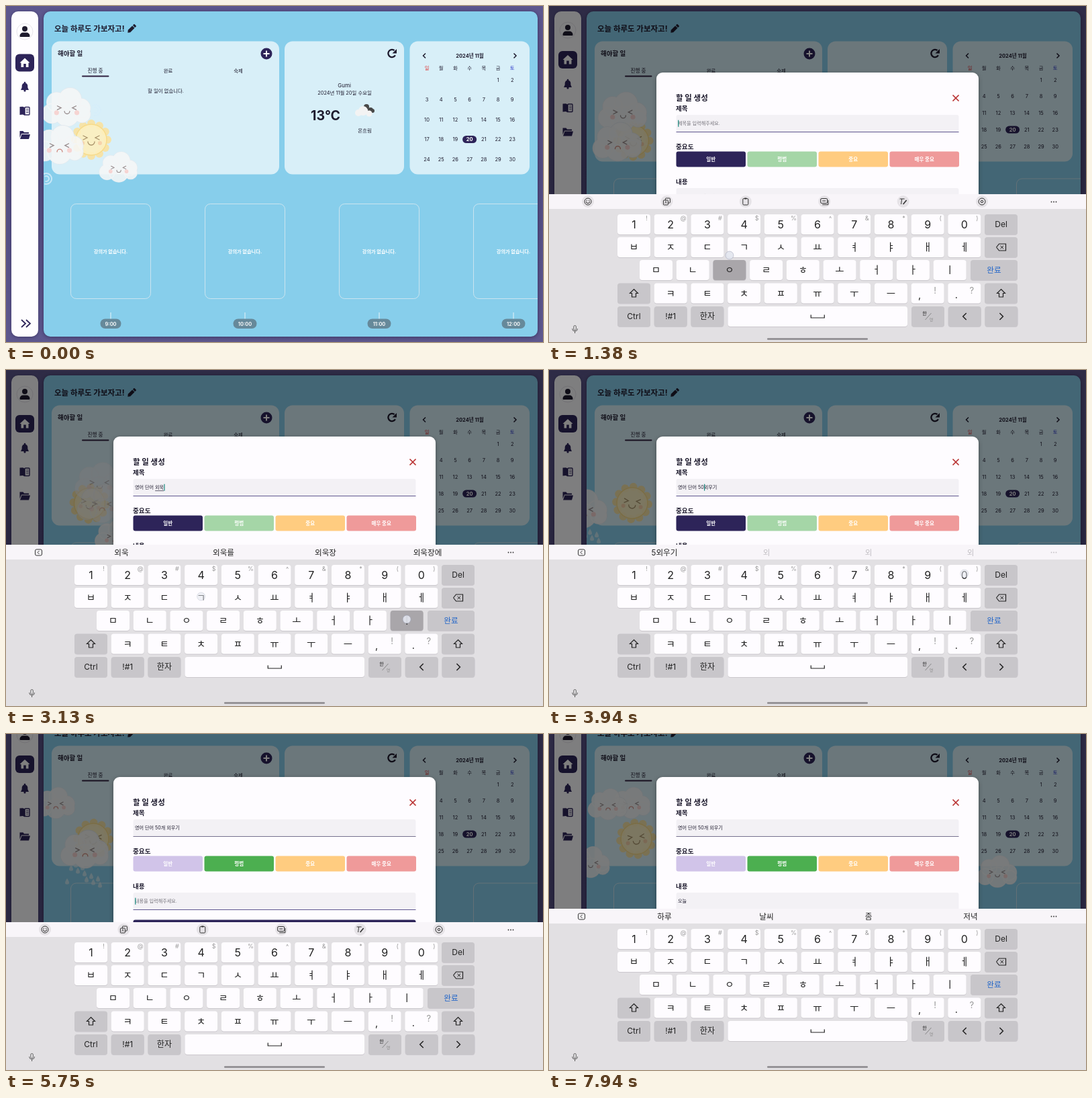
Recreate the animation shown at these times as an HTML page with a canvas. Size 800 by 500 pixels, loop 8000 ms.

```html
<!DOCTYPE html>
<html lang="ko">
<head>
<meta charset="utf-8">
<title>할 일 생성</title>
<style>
html, body { margin: 0; width: 100%; height: 100%; overflow: hidden; background: #56508a; }
canvas { display: block; width: 800px; height: 500px; }
</style>
</head>
<body>
<canvas id="stage" width="800" height="500"></canvas>
<script>
const c = document.getElementById('stage').getContext('2d');
const LOOP = 8000, NAVY = '#2d2459', INK = '#1e1b2e';
const FONT = "Inter, 'Noto Sans CJK KR', 'Noto Sans CJK JP', sans-serif";

// Drawing helpers
function box(x, y, w, h, r, fill, stroke, lw = 1) {
  c.beginPath();
  c.roundRect(x, y, w, h, r);
  if (fill) { c.fillStyle = fill; c.fill(); }
  if (stroke) { c.strokeStyle = stroke; c.lineWidth = lw; c.stroke(); }
}
function disc(x, y, r, fill) {
  c.beginPath();
  c.arc(x, y, r, 0, Math.PI * 2);
  c.fillStyle = fill;
  c.fill();
}
function line(points, color, lw = 1) {
  c.beginPath();
  for (let i = 0; i < points.length; i += 2) c.lineTo(points[i], points[i + 1]);
  c.strokeStyle = color;
  c.lineWidth = lw;
  c.stroke();
}
function shape(points, fill) {
  c.beginPath();
  for (let i = 0; i < points.length; i += 2) c.lineTo(points[i], points[i + 1]);
  c.closePath();
  c.fillStyle = fill;
  c.fill();
}
function text(s, x, y, size, color = INK, align = 'center', weight = 400) {
  c.font = `${weight} ${size}px ${FONT}`;
  c.textAlign = align;
  c.fillStyle = color;
  c.fillText(s, x, y + size * 0.36);
}
function at(x, y, draw) {
  c.save();
  c.translate(x, y);
  draw();
  c.restore();
}
function shadow(color, blur, dy) {
  c.shadowColor = color;
  c.shadowBlur = blur;
  c.shadowOffsetY = dy;
}

// Motion helpers
const clamp = v => Math.max(0, Math.min(1, v));
function ramp(t, a, b) {
  const u = clamp((t - a) / (b - a));
  return u * u * (3 - 2 * u);
}
function track(t, keys) {
  if (t <= keys[0][0]) return keys[0].slice(1);
  for (let i = 1; i < keys.length; i++) {
    const a = keys[i - 1], b = keys[i];
    if (t < b[0]) return a.slice(1).map((v, j) => v + (b[j + 1] - v) * (t - a[0]) / (b[0] - a[0]));
  }
  return keys[keys.length - 1].slice(1);
}

// Keyboard layout
const PITCH = 54.7, ROWS = [290, 324, 358, 392.5, 427];
const keys = [];
function addKey(label, x, row, w = 49, gray = false, hint = '') {
  keys.push({ label, x, y: ROWS[row], w, gray, hint });
}
[...'1234567890'].forEach((k, i) => addKey(k, 102 + PITCH * i, 0, 49, false, '!@#$%^&*()'[i]));
[...'ㅂㅈㄷㄱㅅㅛㅕㅑㅐㅔ'].forEach((k, i) => addKey(k, 102 + PITCH * i, 1));
[...'ㅁㄴㅇㄹㅎㅗㅓㅏㅣ'].forEach((k, i) => addKey(k, 135 + PITCH * i, 2));
[...'ㅋㅌㅊㅍㅠㅜㅡ,.'].forEach((k, i) => addKey(k, 102 + PITCH * (i + 1), 3, 49, false, ['!', '?'][i - 7] || ''));
addKey('Del', 649, 0, 49, true);
addKey('back', 649, 1, 49, true);
addKey('완료', 628, 2, 70, true);
addKey('shift', 102, 3, 49, true);
addKey('shift', 649, 3, 49, true);
['Ctrl', '!#1', '한자'].forEach((k, i) => addKey(k, 102 + PITCH * i, 4, 49, true));
addKey(' ', 266.5, 4, 267.5);
['한/영', '<', '>'].forEach((k, i) => addKey(k, 540 + PITCH * i, 4, 49, true));

// Each step: time, key, text before the caret, suggestions, text after the caret
const titleSteps = [
  [1430, 'ㅇ', 'ㅇ'], [1530, 'ㅕ', '여'], [1620, 'ㅇ', '영'], [1720, 'ㅇ', '영ㅇ'],
  [1820, 'ㅓ', '영어', '영어,영어로,영어를,영어는'], [1930, ' ', '영어 ', '공부,단어,수업,로'],
  [2020, 'ㄷ', '영어 ㄷ'], [2110, 'ㅏ', '영어 다'], [2190, 'ㄴ', '영어 단'], [2270, 'ㅇ', '영어 단ㅇ'],
  [2360, 'ㅓ', '영어 단어'], [2490, ' ', '영어 단어 ', '외우기,공부,시험,를'],
  [2610, 'ㅇ', '영어 단어 ㅇ'], [2700, 'ㅗ', '영어 단어 오'], [2790, 'ㅣ', '영어 단어 외'],
  [2890, 'ㅇ', '영어 단어 욍'], [2980, 'ㅜ', '영어 단어 외우'], [3080, 'ㄱ', '영어 단어 외욱'],
  [3180, 'ㅣ', '영어 단어 외우기', '외우기,외우기로,외우기는,외우기를'],
  [3480, '', '영어 단어 ', '외우기,외우기로,외우기는,외우기를', '외우기'],
  [3690, '5', '영어 단어 5', '~5외우기,외,외,외', '외우기'],
  [3890, '0', '영어 단어 50', '~5외우기,외,외,외', '외우기'],
  [4200, 'ㄱ', '영어 단어 50ㄱ', '개,가,그,것', '외우기'],
  [4340, 'ㅐ', '영어 단어 50개', '개,개의,개를,개월', '외우기'],
  [4520, ' ', '영어 단어 50개 ', '나,아,난,네', '외우기']
];
const bodySteps = [
  [6300, 'ㅇ', 'ㅇ', '오늘,아,이,어'], [6500, 'ㅗ', '오', '오,오늘,오전,오후'], [6720, 'ㄴ', '온', '온,오늘,온라인,온도'],
  [6950, 'ㅡ', '오느', '오늘,오늘은,오늘도,오느'], [7180, 'ㄹ', '오늘', '오늘,오늘은,오늘도,오늘의'],
  [7430, ' ', '오늘 ', '하루,날씨,좀,저녁']
];
const allSteps = [...titleSteps, ...bodySteps];
const lastStep = (steps, t) => steps.filter(s => s[0] <= t).pop();
const taps = [[140, 388, 71], [870, 300, 193], [3430, 231, 175], [4800, 347, 228], [5440, 300, 303]];

// Background creatures
function cloud(x, y, s, alpha, mood = 0) {
  if (alpha <= 0) return;
  at(x, y, () => {
    c.scale(s, s);
    c.globalAlpha = alpha * 0.88;
    c.beginPath();
    for (const [px, py, r] of [[-20, 8, 13], [-14, -7, 13], [4, -11, 15], [18, 1, 13], [20, 9, 11], [0, 9, 16]]) {
      c.moveTo(px + r, py);
      c.arc(px, py, r, 0, Math.PI * 2);
    }
    c.strokeStyle = '#e2eaef';
    c.lineWidth = 1.5;
    c.stroke();
    c.fillStyle = '#f6f7f8';
    c.fill();
    disc(-14, 7, 3.2, '#f8d0cd');
    disc(13, 7, 3.2, '#f8d0cd');
    const ink = '#8d7f80';
    line([-13, -2, -8, 0.5, -13, 3], ink, 1.2);
    line([12, -2, 7, 0.5, 12, 3], ink, 1.2);
    c.beginPath();
    c.arc(0, mood ? 9 : 5, 3.5, mood ? Math.PI : 0, mood ? 0 : Math.PI);
    c.strokeStyle = mood ? '#c8786d' : ink;
    c.stroke();
  });
}
function sun(t) {
  const [x, y] = track(t, [[0, 127, 199], [630, 126, 201], [3940, 124, 198], [5190, 130, 191], [8000, 130, 191]]);
  at(x, y, () => {
    c.globalAlpha = 0.9;
    c.rotate(Math.sin(t / 450) * 0.12);
    for (let i = 0; i < 12; i++) disc(24 * Math.cos(i * Math.PI / 6), 24 * Math.sin(i * Math.PI / 6), 6, '#fae3a0');
    disc(0, 0, 23, '#fdf0be');
    c.beginPath();
    c.arc(0, 0, 23, 0, Math.PI * 2);
    c.strokeStyle = '#f7da87';
    c.lineWidth = 1.5;
    c.stroke();
    line([-12, -6, -6, -3, -12, 0], '#a08a61', 1.3);
    line([12, -6, 6, -3, 12, 0], '#a08a61', 1.3);
    disc(-13, 5, 3, '#f8d0a8');
    disc(13, 5, 3, '#f8d0a8');
    c.beginPath();
    c.arc(0, 3, 5, 0, Math.PI);
    c.strokeStyle = '#a08a61';
    c.stroke();
  });
}
function rain(x, y, t) {
  c.globalAlpha = 0.75;
  for (let i = 0; i < 12; i++) {
    const px = x - 27 + (i * 23) % 56, py = y + 19 + (i * 17 + t * 0.045) % 38;
    c.beginPath();
    c.moveTo(px, py - 5);
    c.quadraticCurveTo(px + 6, py + 4, px, py + 4);
    c.quadraticCurveTo(px - 6, py + 4, px, py - 5);
    c.fillStyle = '#d9ecf5';
    c.fill();
  }
  c.globalAlpha = 1;
}
function swirl(x, y, alpha) {
  c.globalAlpha = alpha;
  c.strokeStyle = '#d6eefa';
  c.lineWidth = 2;
  for (const r of [4, 8]) {
    c.beginPath();
    c.arc(x, y, r, -2, 1.8);
    c.stroke();
  }
  c.globalAlpha = 1;
}
function creatures(t) {
  c.save();
  c.beginPath();
  c.roundRect(56, 8, 736, 484, 10);
  c.clip();
  c.lineCap = 'round';
  swirl(133 + t * 0.02, 155, 0.8 * (1 - ramp(t, 200, 500)));
  swirl(60 + t * 0.015, 257, 0.8 * (1 - ramp(t, 700, 1400)));
  sun(t);
  const late = ramp(t, 2800, 3500);
  cloud(...track(t, [[0, 91, 151], [630, 98, 152], [2440, 128, 165], [3500, 146, 168]]), 1.12, 1 - late);
  cloud(...track(t, [[0, 80, 207], [630, 85, 205], [2440, 127, 199], [3500, 152, 199]]), 1.12, 1 - late, 1);
  cloud(168 + t * 0.105, 240, 0.88, 1 - ramp(t, 300, 600));
  cloud(668 + (t - 7940) * 0.105, 248 - 8 * ramp(t, 2600, 5000), 0.92, 1, t < 4000 ? 1 : 0);
  const [rx, alpha] = track(t, [[3300, 20, 0], [3700, 40, 1], [3940, 52, 1], [5190, 96, 1], [5750, 118, 1], [6600, 148, 1], [7200, 168, 0]]);
  if (alpha > 0) {
    rain(rx, 205, t);
    cloud(rx, 207, 1.1, alpha, 1);
  }
  cloud(62 + (t - 5190) * 0.022, 138, 0.9, ramp(t, 4800, 5190), 1);
  cloud(88 + (t - 7940) * 0.03, 140, 0.9, ramp(t, 6700, 7200), 1);
  cloud(62 + (t - 7940) * 0.04, 226, 0.9, ramp(t, 7000, 7500));
  c.restore();
}

// Dashboard
function sidebar(k) {
  shadow('rgba(20,15,50,.4)', 5, 1);
  box(8, 8, 40, 484, 10, '#fefdff');
  shadow('transparent', 0, 0);
  at(28, 38 - 2 * k, () => {
    c.beginPath();
    c.arc(0, 0, 12, 0, Math.PI * 2);
    c.strokeStyle = '#e7e5ec';
    c.lineWidth = 1;
    c.stroke();
    disc(0, -4, 4, INK);
    box(-7.5, 1.5, 15, 6.5, [5, 5, 1, 1], INK);
  });
  at(28, 84.5 - 4.5 * k, () => {
    box(-14, -13, 28, 26, 6, NAVY);
    shape([-7.5, 0, 0, -7, 7.5, 0, 5.5, 0, 5.5, 6.5, 1.8, 6.5, 1.8, 1.5, -1.8, 1.5, -1.8, 6.5, -5.5, 6.5, -5.5, 0], '#fff');
  });
  at(28, 120 - 4 * k, () => {
    box(-4.3, -5.5, 8.6, 10, [4.3, 4.3, 0, 0], NAVY);
    shape([-4.3, 1.5, 4.3, 1.5, 6, 5, -6, 5], NAVY);
    disc(0, -6, 1.3, NAVY);
    disc(0, 6, 1.6, NAVY);
  });
  at(28, 156 - 4.5 * k, () => {
    shape([-7.5, -6, -3, -6.2, 0, -5, 0, 7, -3, 5.6, -7.5, 6], NAVY);
    c.beginPath();
    c.roundRect(0, -5.5, 7, 11.5, 1);
    c.strokeStyle = NAVY;
    c.lineWidth = 1.4;
    c.stroke();
    for (const y of [-2.5, 0, 2.5]) line([2, y, 5.5, y], NAVY, 0.9);
  });
  at(28, 192 - 4.5 * k, () => {
    shape([-7.5, -6, -2.5, -6, -1, -4, 6, -4, 6, -2, -5, -2, -7.5, 4], NAVY);
    shape([-4.5, -1, 8, -1, 6, 6, -7, 6], NAVY);
  });
  for (const x of [23, 30]) line([x, 467, x + 6, 472.5, x, 478], NAVY, 1.8);
}
function calendar(k) {
  line([625, 70.5, 621.5, 74, 625, 77.5], INK, 1.5);
  line([756.5, 70.5, 760, 74, 756.5, 77.5], INK, 1.5);
  text('2024년 11월', 691, 74, 7.5, INK, 'center', 700);
  [...'일월화수목금토'].forEach((d, i) =>
    text(d, 627 + i * 21.2, 92.5, 7.3, i === 0 ? '#d33' : i === 6 ? '#2b35c9' : INK));
  for (let d = 1; d <= 30; d++) {
    const n = d + 4, x = 627 + (n % 7) * 21.2, y = 110 + Math.floor(n / 7) * (29.5 - 4.8 * k);
    if (d === 20) box(x - 10.5, y - 5.5, 21, 11, 5.5, NAVY);
    text(d, x, y, 7.5, d === 20 ? '#fff' : INK, 'center', d === 20 ? 700 : 400);
  }
}
function dashboard(t, k) {
  const g = c.createLinearGradient(0, 0, 0, 500);
  g.addColorStop(0, '#5d578e');
  g.addColorStop(0.5, '#524c80');
  g.addColorStop(1, '#5d578e');
  c.fillStyle = g;
  c.fillRect(0, -40, 800, 580);
  sidebar(k);
  shadow('rgba(20,15,50,.5)', 6, 1);
  box(56, 8, 736, 484, 10, '#87ceeb');
  shadow('transparent', 0, 0);

  text('오늘 하루도 가보자고!', 72, 33.5, 11.5, INK, 'left', 700);
  at(187, 34, () => {
    c.rotate(-Math.PI / 4);
    shape([-8, 0, -5, -2.4, 4, -2.4, 4, 2.4, -5, 2.4], INK);
    box(5, -2.4, 3, 4.8, 1, INK);
  });

  const h = 198 - 19 * k;
  for (const [x, w] of [[68, 339], [415, 178], [601.5, 178.5]]) box(x, 52.5, w, h, 12, 'rgba(255,255,255,.68)');
  text('해야할 일', 77, 71, 9.5, INK, 'left', 700);
  disc(388, 71, 8.5, NAVY);
  line([383.5, 71, 392.5, 71], '#fff', 2);
  line([388, 66.5, 388, 75.5], '#fff', 2);
  text('진행 중', 133, 96, 7.6, INK, 'center', 500);
  text('완료', 241.5, 96, 7.4);
  text('숙제', 346, 96, 7.4);
  box(113, 103.5, 40.5, 2, 1, '#302040');
  text('할 일이 없습니다.', 238, 126.5, 7.4);

  c.beginPath();
  c.arc(575, 70.5, 5.6, 0.5, 5.4);
  c.strokeStyle = INK;
  c.lineWidth = 2.3;
  c.stroke();
  shape([582, 64, 582, 70.5, 575.5, 70.5], INK);
  text('Gumi', 504, 118, 8);
  text('2024년 11월 20일 수요일', 504.5, 129, 7.4);
  text('13°C', 476, 163, 19.5, INK, 'center', 700);
  for (const [x, y, r] of [[537, 150, 4], [543, 155, 4], [546, 156, 3]]) disc(x, y, r, '#484848');
  for (const [x, y, r] of [[525, 159, 5], [532, 156, 7], [541, 160, 4.5]]) disc(x, y, r, '#f3f3f3');
  text('온흐림', 534.5, 185, 7.4);
  calendar(k);

  c.save();
  c.beginPath();
  c.rect(56, 8, 736, 484);
  c.clip();
  for (let i = 0; i < 4; i++) {
    const x = 156 + i * 200, y = 294.5 - 37.5 * k;
    box(x - 59.5, y, 119, 141, 8, null, 'rgba(225,235,240,.75)');
    text('강의가 없습니다.', x, y + 70.5, 7.2, '#fff', 'center', 700);
    line([x, 456, x, 466], '#e8f3f8', 1);
    const w = i ? 35 : 31;
    box(x - w / 2, 465.5, w, 14.5, 7.3, '#66899a');
    text(`${9 + i}:00`, x, 472.8, 7.5, '#fff', 'center', 600);
  }
  c.restore();
  creatures(t);
}

// Dialog
function field(y, step, hint, focus, t) {
  box(189.5, y, 421, 25, [3, 3, 0, 0], '#f3f1f5');
  line([189.5, y + 25.5, 610.5, y + 25.5], focus ? '#5f568f' : '#77718f', 1);
  const mid = y + 12.7, head = step ? step[2] : '', value = head + (step && step[4] || '');
  text(value || hint, 192, mid, 7.1, value ? INK : '#77757d', 'left');
  if (!focus) return;
  const end = 192 + c.measureText(head).width, word = head.split(' ').pop();
  if (word && !/\d/.test(word)) {
    line([end - c.measureText(word).width, mid + 5, end, mid + 5], INK, 0.7);
  }
  const since = t - (step ? step[0] : focus);
  if (since % 1000 < 500) line([end + 0.8, mid - 5, end + 0.8, mid + 5], '#16877c', 1.2);
}
function dialog(t, y) {
  shadow('rgba(0,0,0,.35)', 6, 2);
  box(160, y, 480, 264.5, 9, '#fefcff');
  shadow('transparent', 0, 0);
  text('할 일 생성', 189, y + 38, 11.5, INK, 'left', 700);
  line([601.5, y + 33.5, 610.5, y + 42.5], '#b93434', 1.7);
  line([610.5, y + 33.5, 601.5, y + 42.5], '#b93434', 1.7);
  text('제목', 189, y + 54, 9.6, INK, 'left', 700);
  field(y + 63, lastStep(titleSteps, t), '제목을 입력해주세요.', t > 900 && t < 4750 && 900, t);
  text('중요도', 189, y + 110.5, 9.6, INK, 'left', 700);
  const picked = t < 4830 ? 0 : 1;
  [['일반', NAVY, '#d1c4e9'], ['평범', '#4caf50', '#a5d6a7'], ['중요', '#ff9800', '#ffcc80'], ['매우 중요', '#f44336', '#ef9a9a']]
    .forEach(([name, on, off], i) => {
      const x = 189.5 + i * 106;
      box(x, y + 117.5, 103.5, 23, 3, i === picked ? on : off);
      text(name, x + 51.7, y + 129, 7.5, '#fff', 'center', 700);
    });
  text('내용', 189, y + 163, 9.6, INK, 'left', 700);
  field(y + 172, lastStep(bodySteps, t), '내용을 입력해주세요.', t > 5480 && 5480, t);
  box(189.5, y + 212.5, 421, 23, 3, NAVY);
  text('생성', 400, y + 224, 7.5, '#fff', 'center', 700);
}

// Keyboard
function toolIcon(i, x, y) {
  disc(x, y, 9, '#e6e3e7');
  at(x, y, () => {
    c.strokeStyle = '#333';
    c.lineWidth = 1;
    if (i === 0 || i === 5) {
      c.beginPath();
      c.arc(0, 0, 5, 0, Math.PI * 2);
      c.stroke();
      c.beginPath();
      c.arc(0, 0, i ? 1.7 : 2.6, 0, i ? Math.PI * 2 : Math.PI);
      c.stroke();
      if (!i) { disc(-1.8, -1.5, 0.7, '#333'); disc(1.8, -1.5, 0.7, '#333'); }
    } else if (i === 1) {
      box(-2, -5, 7, 7, 1, null, '#333');
      box(-5, -2, 7, 7, 1, '#e6e3e7', '#333');
      text('A', -1.5, 1.5, 5, '#333');
    } else if (i === 2) {
      box(-4, -4.5, 8, 9.5, 1.5, null, '#333');
      box(-2, -5.5, 4, 2, 1, '#333');
    } else if (i === 3) {
      box(-5.5, -4.5, 10, 7, 1.5, null, '#333');
      line([-3, -1, 2, -1], '#333');
      line([-3, 4.7, 5.7, 4.7, 5.7, -2], '#333');
    } else {
      line([-5, -4, 2, -4], '#333');
      line([-2, -4, -3, 4], '#333');
      line([0, 4, 5, -2], '#333', 1.6);
    }
  });
}
function suggestions(t) {
  const step = lastStep(allSteps, t), word = step[2].split(' ').pop();
  let words = step[3] || ['', '를', '장', '장에'].map(s => word + s).join();
  const faint = words[0] === '~';
  if (faint) words = words.slice(1);
  words.split(',').forEach((w, i) => text(w, 172 + i * 152, 271.5, 11.6, faint && i ? '#c4c1c6' : '#222'));
  box(43.5, 267, 10, 9, 2, null, '#333');
  line([49.5, 269, 47, 271.5, 49.5, 274], '#333');
  return faint;
}
function strip(t, tools) {
  c.fillStyle = '#f8f5f9';
  c.fillRect(0, 260, 800, 22);
  let faint = false;
  if (tools) for (let i = 0; i < 6; i++) toolIcon(i, 58 + i * 117.4, 271);
  else faint = suggestions(t);
  for (const x of [748.5, 752, 755.5]) disc(x, 271.5, 0.9, faint ? '#c4c1c6' : '#333');
}
function keyFace(k) {
  const x = k.x + k.w / 2, y = k.y + 15, ink = '#222';
  if (k.label === ' ') line([x - 10, y - 2.5, x - 10, y + 2, x + 10, y + 2, x + 10, y - 2.5], ink, 1.2);
  else if (k.label === 'shift') {
    c.beginPath();
    [[0, -6], [6, 0], [3, 0], [3, 5.5], [-3, 5.5], [-3, 0], [-6, 0]].forEach(p => c.lineTo(x + p[0], y + p[1]));
    c.closePath();
    c.strokeStyle = ink;
    c.lineWidth = 1.2;
    c.stroke();
  } else if (k.label === 'back') {
    line([x - 7, y, x - 3, y - 5, x + 7, y - 5, x + 7, y + 5, x - 3, y + 5, x - 7, y], ink, 1.2);
    line([x - 1, y - 2.2, x + 3.5, y + 2.2], ink);
    line([x + 3.5, y - 2.2, x - 1, y + 2.2], ink);
  } else if (k.label === '<' || k.label === '>') {
    const d = k.label === '<' ? 1 : -1;
    line([x + 2.5 * d, y - 5, x - 2.5 * d, y, x + 2.5 * d, y + 5], ink, 1.5);
  } else if (k.label === '한/영') {
    text('한', x - 5, y - 5, 7, ink);
    line([x - 4, y + 5, x + 5, y - 5], '#777', 0.8);
    text('영', x + 5, y + 5, 6, '#888');
  } else if (k.w === 49 && k.gray) text(k.label, x, y, 12, ink);
  else if (k.label === '완료') text(k.label, x, y, 11.6, '#2467c9');
  else {
    const mark = k.label === ',' || k.label === '.';
    text(k.label, mark ? x - 12 : x, mark ? y + 2 : y, /\d/.test(k.label) ? 16 : 14.5, ink);
    if (k.hint) text(k.hint, x + (mark ? 11 : 19), y - (mark ? 4 : 9), mark ? 13 : 9, '#999');
  }
}
function keyboard(t, tools) {
  c.fillStyle = '#e2e0e3';
  c.fillRect(0, 282, 800, 240);
  strip(t, tools);
  const hit = allSteps.find(s => t > s[0] - 70 && t < s[0] + 30);
  for (const k of keys) {
    const down = hit && hit[1] === k.label;
    box(k.x, k.y + 1, k.w, 30, 4, '#cbc8cd');
    box(k.x, k.y, k.w, 30, 4, down ? '#a9a6aa' : k.gray ? '#c8c6ca' : '#fefcff');
    keyFace(k);
  }
}
function navBar() {
  box(36.8, 475.5, 3.6, 7, 1.8, null, '#555', 0.9);
  c.beginPath();
  c.arc(38.6, 480, 4, 0, Math.PI);
  c.strokeStyle = '#555';
  c.stroke();
  line([38.6, 484, 38.6, 487], '#555');
  box(325, 494.3, 150, 2.4, 1.2, '#8a888c');
}

// Fingers
function touch(x, y, alpha) {
  if (alpha <= 0) return;
  c.globalAlpha = alpha;
  disc(x, y, 6, 'rgba(226,229,238,.9)');
  c.beginPath();
  c.arc(x, y, 6, 0, Math.PI * 2);
  c.strokeStyle = 'rgba(150,155,175,.6)';
  c.lineWidth = 0.8;
  c.stroke();
  c.globalAlpha = 1;
}
const fade = d => d < -70 ? 0 : 1 - clamp((d - 20) / 70);
function fingers(t) {
  for (const [time, x, y] of taps) touch(x, y, fade(t - time));
  for (const s of allSteps) {
    const k = keys.find(key => key.label === s[1]);
    if (k) touch(s[1] === ' ' ? 481 : k.x + k.w / 2, k.y + (s[1] === ' ' ? 26 : 13), fade(t - s[0]));
  }
  if (t > 5030 && t < 5260) {
    const u = ramp(t, 5030, 5180), x = 814 - 26 * u;
    disc(x, 177, 13, 'rgba(190,198,206,.75)');
    line([x + 4, 172, x - 2, 177, x + 4, 182], '#667480', 1.4);
    touch(796 - 83 * u, 200 + 18 * u, 1 - ramp(t, 5210, 5260));
  }
}

function draw(t) {
  const shown = ramp(t, 240, 400);
  const up = ramp(t, 950, 1200) - ramp(t, 5230, 5400) + ramp(t, 5470, 5660);
  const k = ramp(t, 1020, 1220) - ramp(t, 5260, 5400) + ramp(t, 5500, 5680);
  const pan = 35 * ramp(t, 5540, 5700);
  const tools = t < titleSteps[0][0] || (t > 5400 && t < bodySteps[0][0]);
  c.clearRect(0, 0, 800, 500);
  at(0, -pan, () => dashboard(t, k));
  if (shown > 0) {
    c.fillStyle = `rgba(0,0,0,${0.5 * shown})`;
    c.fillRect(0, 0, 800, 500);
    c.globalAlpha = shown;
    dialog(t, 118 - 19 * k - pan);
    c.globalAlpha = 1;
  }
  if (up > 0) {
    at(0, (1 - up) * 240 + (tools ? 20 : 0), () => keyboard(t, tools));
    at(0, (1 - up) * 240, navBar);
  }
  fingers(t);
}

const start = performance.now();
function tick() {
  draw((performance.now() - start) % LOOP);
  requestAnimationFrame(tick);
}
tick();
</script>
</body>
</html>
```
